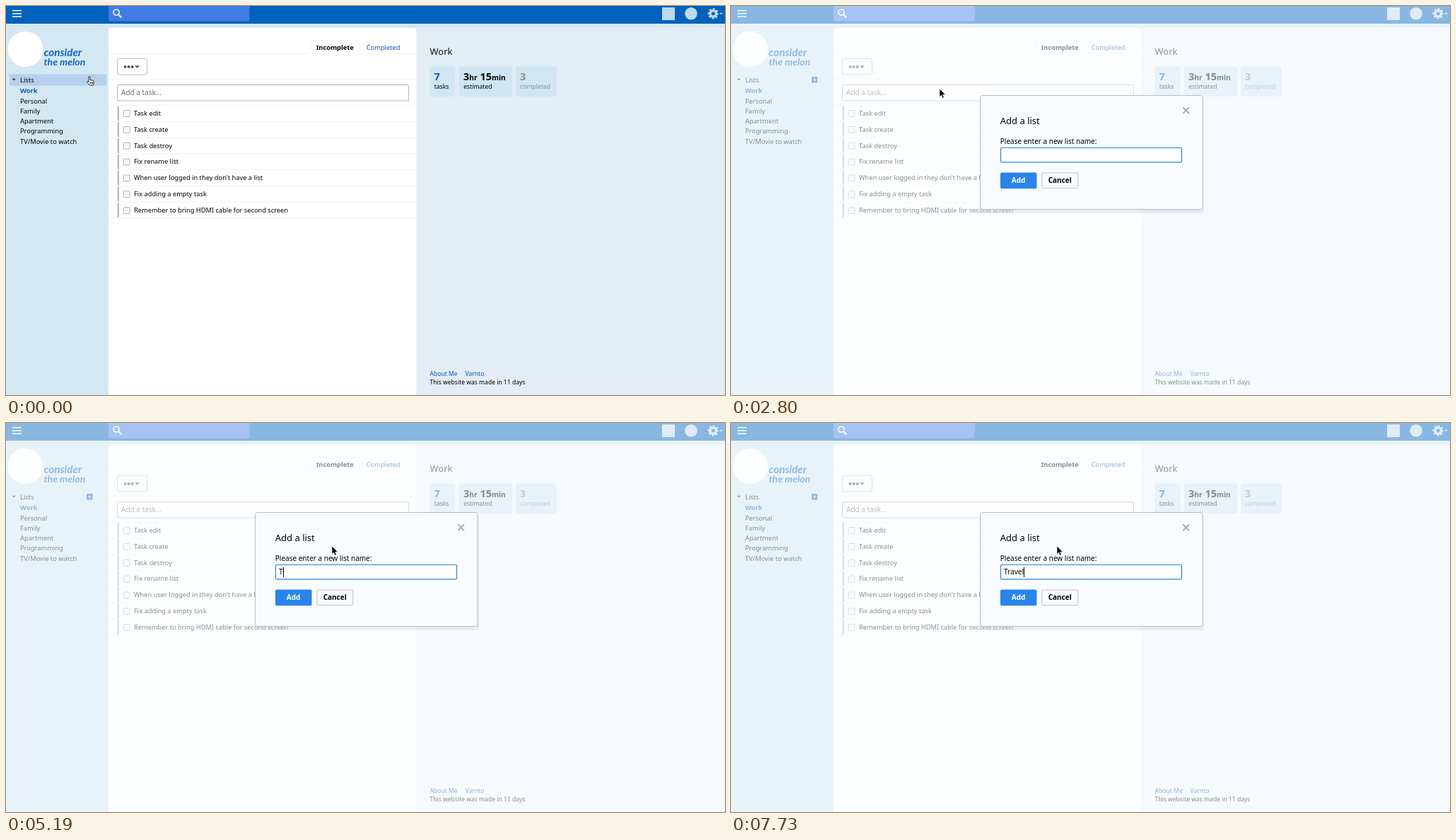
Recreate the animation shown at these times as an HTML page. Size 1017 px wide and 550 px high, loop 8 s.

```html
<!DOCTYPE html>
<html lang="en">
<head>
<meta charset="utf-8">
<title>Add a list</title>
<style>
  html, body { margin: 0; width: 100%; height: 100%; overflow: hidden; background: #d4e8f3; }
  svg { display: block; width: 1017px; height: 550px; font-family: "Noto Sans", "Open Sans", sans-serif; }
  text { white-space: pre; }
</style>
</head>
<body>
<svg id="stage" viewBox="0 0 1017 550" xmlns="http://www.w3.org/2000/svg">
  <g id="page"></g>
  <g id="dialog">
    <rect width="1017" height="550" fill="#fafdff" fill-opacity=".55"/>
    <g id="modal"></g>
  </g>
  <path id="hand" d="M3 1.2c0-1.5 2-1.5 2 0V5l4 .9c1 .2 1.3.9 1.2 2L9.6 12.4H4.2L.8 8.2c-.6-1 .5-1.7 1.3-1L3 8zM5.2 8v2.6M7 8v2.6M8.6 8v2.6"
    fill="#fff" stroke="#111" stroke-width=".9" stroke-linejoin="round"/>
  <path id="arrow" d="M0 0V11.5L2.6 9.1L4.4 13.2L6.4 12.3L4.6 8.4H8.2Z" fill="#000" stroke="#fff" stroke-width=".6"/>
</svg>
<script>
const LOOP = 8000, OPEN = 1850;
const $ = id => document.getElementById(id);
const BLUE = '#0a5cb8';
const LINK = '#0a55b5';

function add(parent, tag, attrs, content) {
  const node = document.createElementNS('http://www.w3.org/2000/svg', tag);
  for (const key in attrs) node.setAttribute(key, attrs[key]);
  if (content !== undefined) node.textContent = content;
  parent.appendChild(node);
  return node;
}
const rect = (parent, x, y, width, height, fill, more) =>
  add(parent, 'rect', { x, y, width, height, fill, ...more });
const path = (parent, d, attrs) => add(parent, 'path', { d, fill: 'none', ...attrs });
const label = (parent, x, y, size, content, fill = '#000', more) =>
  add(parent, 'text', { x, y, 'font-size': size, fill, ...more }, content);
const bold = { 'font-weight': 700 };

const page = $('page');
const modal = $('modal');

function drawHeader() {
  rect(page, 0, 0, 1017, 25, '#0162bd');
  path(page, 'M9 6.5H22M9 10.7H22M9 14.9H22', { stroke: '#fff', 'stroke-width': 1.5 });
  rect(page, 145, -4, 199.5, 25.5, '#417ce2', { rx: 3 });
  add(page, 'circle', { cx: 156, cy: 9, r: 4, fill: 'none', stroke: '#fff', 'stroke-width': 1.6 });
  path(page, 'M159 12L163.3 16.2', { stroke: '#fff', 'stroke-width': 2 });
  const icon = '#bfd8f0';
  rect(page, 928, 2, 18, 18, icon);
  add(page, 'circle', { cx: 969, cy: 10.7, r: 8.8, fill: icon });
  add(page, 'circle', { cx: 1000.3, cy: 10.8, r: 4.2, fill: 'none', stroke: icon, 'stroke-width': 3.4 });
  add(page, 'circle', { cx: 1000.3, cy: 10.8, r: 6.5, fill: 'none', stroke: icon, 'stroke-width': 2.4,
    'stroke-dasharray': '2.9 2.205', 'stroke-dashoffset': 1.45 });
  path(page, 'M1009 9.8H1014L1011.5 12.3Z', { fill: icon });
}

function drawSidebar() {
  add(page, 'circle', { cx: 27.3, cy: 61, r: 25, fill: '#fff' });
  const brand = { ...bold, 'font-style': 'italic', 'font-family': 'Lato, sans-serif' };
  label(page, 53.5, 71, 15.2, 'consider', '#1266c0', brand);
  label(page, 53.5, 83.5, 14, 'the melon', '#1266c0', brand);

  const hover = rect(page, 5.5, 96.3, 136.5, 16.3, '#b6d0ec');
  path(page, 'M8.8 102.8H13.6L11.2 105.4Z', { fill: '#222' });
  label(page, 20, 107.6, 9.4, 'Lists');
  const plus = add(page, 'g', {});
  rect(plus, 114, 100, 8.5, 8.5, '#1a60c4', { rx: 1 });
  path(plus, 'M118.25 102V106.5M116 104.25H120.5', { stroke: '#dcebf8', 'stroke-width': 1 });

  label(page, 20, 123.4, 9.3, 'Work', BLUE, bold);
  ['Personal', 'Family', 'Apartment', 'Programming', 'TV/Movie to watch'].forEach((name, i) =>
    label(page, 20, 137.7 + i * 14.25, 9.3, name));
  return { hover, plus };
}

function drawTasks() {
  rect(page, 145, 31, 435.5, 540, '#fff', { rx: 4 });
  path(page, 'M145 67.5H430.5V48.5H500.5V67.5H580M145 103.5H580', { stroke: '#f1f3f5' });
  label(page, 438.7, 61.5, 9.3, 'Incomplete', '#000', bold);
  label(page, 509.7, 62, 9.3, 'Completed', LINK);

  rect(page, 157.5, 74.5, 42, 22.5, '#fff', { rx: 2, stroke: '#bdbdbd' });
  for (const cx of [168.6, 173.6, 178.6]) add(page, 'circle', { cx, cy: 86, r: 2, fill: '#555' });
  path(page, 'M182 84.2H189L185.5 88Z', { fill: '#555' });

  rect(page, 157.5, 111.5, 412, 22.5, '#fff', { rx: 1, stroke: '#b3b3b3' });
  label(page, 163, 126.2, 10, 'Add a task...', '#6f6f6f');

  const tasks = ['Task edit', 'Task create', 'Task destroy', 'Fix rename list',
    "When user logged in they don't have a list", 'Fix adding a empty task',
    'Remember to bring HDMI cable for second screen'];
  path(page, 'M145 140.5H580', { stroke: '#f1f3f5' });
  tasks.forEach((task, i) => {
    const y = 140.5 + i * 22.83;
    path(page, `M145 ${Math.round(y + 22.3) + .5}H580`, { stroke: '#f1f3f5' });
    rect(page, 157.5, y + 1, 2.5, 20.6, '#bcbcc8');
    rect(page, 166.3, y + 7.2, 8.8, 8.8, '#fff', { rx: 1, stroke: '#aaa' });
    label(page, 181, y + 14.5, 9.28, task);
  });
}

function drawSummary() {
  const panel = rect(page, 580.5, 31, 435.5, 520, '#e2edf6');
  label(page, 599.5, 69.2, 13, 'Work', '#111');
  const stats = [
    [599.5, 36, [['7', 14.5]], 'tasks', BLUE, '#000'],
    [641, 75, [['3', 14.5], ['hr', 10.2], [' 15', 14.5], ['min', 10.2]], 'estimated', '#000', '#000'],
    [721, 58, [['3', 14.5]], 'completed', '#868e94', '#868e94']
  ];
  for (const [x, width, parts, caption, color, captionColor] of stats) {
    rect(page, x, 85.5, width, 42.5, '#d1e6f2', { rx: 3 });
    const value = label(page, x + 6, 105, 14.5, '', color, bold);
    for (const [part, size] of parts) add(value, 'tspan', { 'font-size': size }, part);
    label(page, x + 6.2, 117, 8.6, caption, captionColor);
  }
  label(page, 599.5, 523, 8.55, 'About Me', LINK);
  label(page, 649.5, 523, 8.55, 'Varnto', LINK);
  label(page, 599.5, 535.2, 8.55, 'This website was made in 11 days');
  return panel;
}

function drawModal() {
  rect(modal, 354, 129, 315, 164, '#b9c8d4', { rx: 4, opacity: .3 });
  rect(modal, 352.5, 126.5, 314.5, 161, '#f8fcff', { rx: 3, stroke: '#b9bdc1' });
  path(modal, 'M639.3 143.4L648 152.1M648 143.4L639.3 152.1', { stroke: '#a6a9ac', 'stroke-width': 2 });
  label(modal, 380.8, 167, 13, 'Add a list');
  label(modal, 380.8, 194.6, 10, 'Please enter a new list name:');
  rect(modal, 381.5, 200.5, 256, 20.3, '#fff', { rx: 1.5, stroke: '#2b82df', 'stroke-width': 1.2 });
  rect(modal, 381, 235.5, 51.5, 22.7, '#2a84e9', { rx: 2 });
  rect(modal, 439.8, 236, 51, 21.7, '#f9fcfe', { rx: 2, stroke: '#bcbfc2' });
  const centred = { ...bold, 'text-anchor': 'middle' };
  label(modal, 406.6, 250.4, 10, 'Add', '#fff', centred);
  label(modal, 465.2, 250.4, 10, 'Cancel', '#000', centred);
  return {
    entry: label(modal, 386, 214.2, 10.1, ''),
    caret: rect(modal, 386, 204, 1, 14, '#000')
  };
}

drawHeader();
const { hover, plus } = drawSidebar();
const panel = drawSummary();
drawTasks();
const { entry, caret } = drawModal();

// Each list holds [start time, value...] steps.
const handSteps = [[0, 114, 99.5], [140, 113.5, 102], [350, 113.5, 103]];
const arrowSteps = [[OPEN, 116.7, 102], [2290, 116, 102], [2500, 116, 101.5],
  [2800, 295, 117], [2950, 445, 170], [3100, 461, 174]];
const caretSteps = [[0, 1], [2500, 0], [2950, 1], [3400, 0], [3850, 1], [4440, 0], [4890, 1],
  [6080, 0], [6230, 1], [7280, 0], [7730, 1]];
const keyTimes = [5190, 5490, 5640, 6230, 6680, 6830];

const stepAt = (steps, t) => steps.filter(step => step[0] <= t).pop() || steps[0];
const show = (node, on) => node.setAttribute('visibility', on ? 'inherit' : 'hidden');
const place = (node, [, x, y]) => node.setAttribute('transform', `translate(${x} ${y})`);

function render(t) {
  const open = t >= OPEN;
  show($('dialog'), open);
  show($('arrow'), open);
  show($('hand'), !open);
  show(hover, !open);
  show(plus, t >= 140);
  panel.setAttribute('fill', open ? '#f2f8fe' : '#e2edf6');
  place($('hand'), stepAt(handSteps, t));
  place($('arrow'), stepAt(arrowSteps, t));

  const typed = 'Travel'.slice(0, keyTimes.filter(time => time <= t).length);
  if (entry.textContent !== typed) entry.textContent = typed;
  caret.setAttribute('x', 386 + Math.round(typed ? entry.getComputedTextLength() : 0));
  show(caret, stepAt(caretSteps, t)[1]);
}

const start = performance.now();
function tick() {
  render((performance.now() - start) % LOOP);
  requestAnimationFrame(tick);
}
tick();
</script>
</body>
</html>
```
